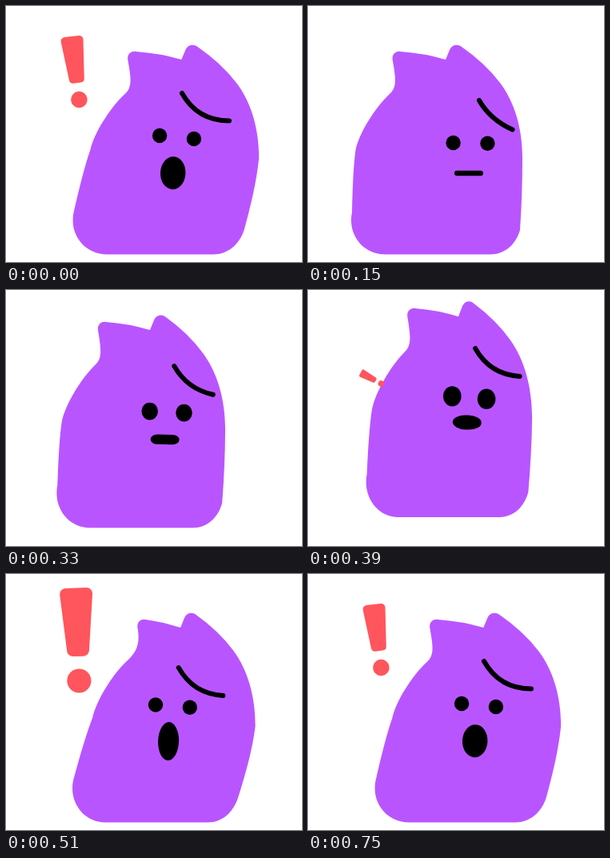
An HTML page that plays this animation: 370x320 px, repeating every 1.17 s.

```html
<!DOCTYPE html>
<html lang="en">
<head>
<meta charset="utf-8">
<title>Surprised blob</title>
<style>
  html, body { margin: 0; width: 100%; height: 100%; overflow: hidden; background: #fff; }
  svg { display: block; width: 100%; height: 100%; }
</style>
</head>
<body>
<svg viewBox="0 0 370 320">
  <g id="blob">
    <path id="body" fill="#b955ff"/>
    <ellipse id="eyeL"/>
    <ellipse id="eyeR"/>
    <path id="brow" fill="none" stroke="#000" stroke-width="6" stroke-linecap="round"/>
    <rect id="mouth"/>
  </g>
  <g id="mark" fill="#ff555d">
    <circle r="10.3"/>
    <path d="M-9-74.5H9L4.5-26H-4.5Z" stroke="#ff555d" stroke-width="10" stroke-linejoin="round"/>
  </g>
</svg>
<script>
const LOOP = 1170, STEP = 30, GROUND = 310.5, LEFT_FOOT = 96;

// The upright body; every other pose bends this outline.
const OUTLINE = `M96 310.5 C72 310.5 54 291 54 268 Q54 262 55 258
  Q56 205 59.5 180 C64 159 83 128 102 110 C111 102 110 92 106 69
  C104 61 109 56 116 57 Q145 59 172 67 L177 55 C180 48 187 47 192 51
  Q221 71 240 96 C258 120 268 152 268 190 C268 220 267 250 265 280
  C260 298 246 310.5 228 310.5Z`;

// x, y: midpoint of the eyes; browY, mouthY: offsets from it
const calm = {
  shift: 0, lean: 0, ear: 0, wide: 1, tall: 1, lift: 0,
  x: 203, y: 171.4, shock: 0, eyeW: 9.2, eyeH: 9.2,
  browY: -53.5, mouthY: 37.5, mouthW: 36, mouthH: 6.5
};
const drift = { ...calm, x: 200.5, y: 170.7 };
const jump = {
  ...calm, shift: 17, lean: 2, wide: 0.96, tall: 1.03, lift: 26.5,
  x: 201.7, y: 134.5, shock: 0.8, eyeW: 11.3, eyeH: 12.7,
  browY: -61.5, mouthY: 31, mouthH: 18
};
const land = {
  ...calm, shift: 28, lean: 20, ear: 11, wide: 0.975,
  x: 208.4, y: 165.1, shock: 0.8, browY: -48, mouthY: 44, mouthW: 26, mouthH: 48
};
const gasp = {
  ...calm, shift: 30, lean: 16.5, wide: 1.01,
  x: 213.5, y: 164, shock: 1, browY: -55, mouthY: 44.7, mouthW: 31.5, mouthH: 41
};

const linear = u => u;
const outCubic = u => 1 - (1 - u) ** 3;
const inOut = u => (1 - Math.cos(Math.PI * u)) / 2;
const clamp = u => Math.min(1, Math.max(0, u));
const mix = (a, b, u) => a + (b - a) * u;
const span = (t, from, to) => clamp((t - from) / (to - from));

// [time, pose, easing towards it]
const timeline = [
  [0, gasp], [150, calm, outCubic], [270, drift, linear],
  [390, jump, inOut], [510, land, inOut], [750, gasp, outCubic], [LOOP, gasp, linear]
];

function poseAt(t) {
  const i = timeline.findIndex(key => key[0] > t);
  const [t0, a] = timeline[i - 1];
  const [t1, b, ease] = timeline[i];
  const u = ease(span(t, t0, t1));
  const pose = {};
  for (const k in a) pose[k] = mix(a[k], b[k], u);
  return pose;
}

function bend(x, y, p) {
  // The upper body leans as one piece; the walls taper down to the feet.
  const upper = clamp((251 + 0.127 * x - y) / 80);
  const ear = x < 140 && y < 95 ? p.ear : 0;
  return [
    LEFT_FOOT + (x - LEFT_FOOT) * p.wide + p.shift + p.lean * upper + ear,
    GROUND + (y - GROUND) * p.tall - p.lift
  ];
}

function set(id, attrs) {
  const el = document.getElementById(id);
  for (const name in attrs) el.setAttribute(name, attrs[name]);
}

function drawBody(p) {
  set('body', {
    d: OUTLINE.replace(/([\d.]+) ([\d.]+)/g, (_, x, y) => bend(+x, +y, p).join(' '))
  });
}

function drawFace(p) {
  const s = p.shock;
  const tilt = mix(0.35, 2, s);
  const eye = { rx: p.eyeW, ry: p.eyeH };
  set('eyeL', { cx: p.x - 21.4, cy: p.y - tilt, ...eye });
  set('eyeR', { cx: p.x + 21.4, cy: p.y + tilt, ...eye });

  const bx = p.x + mix(11, 6.5, s), by = p.y + p.browY;
  const bw = mix(41.5, 59, s), bh = mix(36.5, 34.5, s);
  set('brow', {
    d: `M${bx} ${by}c${bw * 0.21} ${bh * mix(0.42, 0.64, s)}
      ${bw * 0.55} ${bh * mix(0.77, 1, s)} ${bw} ${bh}`
  });

  const { mouthW: w, mouthH: h } = p;
  const mx = p.x - 1.5 - h * 0.08, my = p.y + p.mouthY;
  set('mouth', {
    x: mx - w / 2, y: my - h / 2, width: w, height: h,
    rx: Math.min(w / 2, h * mix(0.5, 1, s)), ry: h / 2,
    transform: `rotate(${2.5 * s} ${mx} ${my})`
  });
}

function drawMark(t) {
  const BIG = 1.46, REST = -6.8;
  let size, turn;
  if (t < 330) {
    const u = outCubic(span(t, 0, 120));
    size = 1 - u;
    turn = REST - 35 * u;
  } else {
    const pop = span(t, 330, 510);
    const settle = inOut(span(t, 540, 630));
    size = mix(BIG * inOut(pop), 1, settle);
    turn = mix(-2 - 62 * (1 - pop ** 3), REST, settle);
  }
  const y = 117 + 16.5 * clamp((size - 1) / (BIG - 1));
  set('mark', {
    transform: `translate(91.4 ${y}) rotate(${turn}) scale(${size})`,
    visibility: size > 0.01 ? 'visible' : 'hidden'
  });
}

function draw(t) {
  const pose = poseAt(t);
  drawBody(pose);
  drawFace(pose);
  const squash = 1 - 0.064 * Math.sin(Math.PI * span(t, 510, 750));
  set('blob', { transform: `translate(0 ${GROUND * (1 - squash)}) scale(1 ${squash})` });
  drawMark(t);
}

const start = performance.now();
function tick() {
  const t = (performance.now() - start) % LOOP;
  draw(Math.floor(t / STEP) * STEP);
  requestAnimationFrame(tick);
}
draw(0);
requestAnimationFrame(tick);
</script>
</body>
</html>
```
